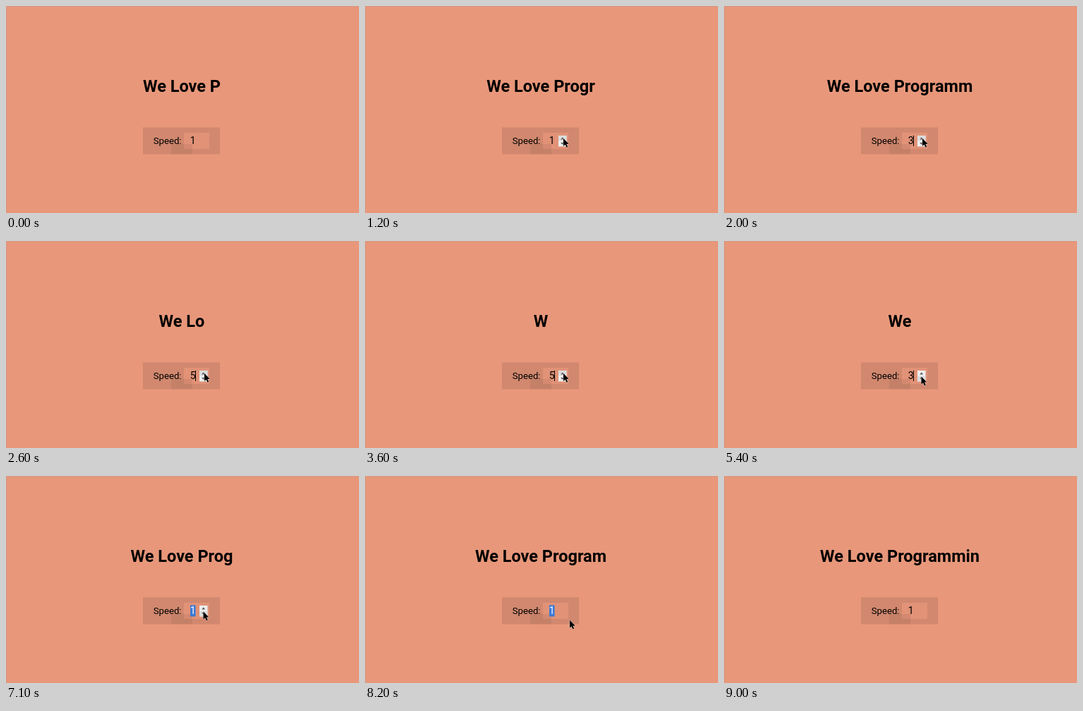
These frames come from a looping animation (500 by 294 pixels, 9100 ms). An HTML page with a canvas:

```html
<!DOCTYPE html>
<html lang="en">
<head>
<meta charset="utf-8">
<title>Auto text effect</title>
<style>
  html, body { margin: 0; width: 100%; height: 100%; overflow: hidden; background: #e8977a; }
  canvas { display: block; }
</style>
</head>
<body>
<canvas id="stage" width="500" height="294"></canvas>
<script>
const ctx = document.getElementById('stage').getContext('2d');
const LOOP = 9100, STEP = 100;
const MESSAGE = 'We Love Programming!';
const FONT = 'Roboto, sans-serif';

// Times of the clicks on the two spinner arrows
const ups = [1600, 1900, 2100, 2300];
const downs = [3900, 3950, 5900, 6100];

// Where the pointer tip rests
const entry = { x: 288, y: 245 };
const onUp = { x: 281, y: 188 };
const onDown = { x: 279.5, y: 192.5 };
const exit = { x: 363, y: 290 };

const between = (t, from, to) => t >= from && t < to;
const passed = (times, t) => times.filter(time => time <= t).length;
const speedAt = t => 1 + passed(ups, t) - passed(downs, t);

// Each letter waits 300 ms divided by the speed set when it was typed.
function typed(t) {
  let count = 9;
  for (let next = 300; next <= t; next += 300 / speedAt(next)) count++;
  return MESSAGE.slice(0, (count - 1) % MESSAGE.length + 1).trim();
}

function glide(t, start, end, from, to) {
  const k = Math.min(Math.max((t - start) / (end - start), 0), 1);
  return { x: from.x + (to.x - from.x) * k, y: from.y + (to.y - from.y) * k };
}

function pointerAt(t) {
  if (t < 2000) return glide(t, 300, 1200, entry, onUp);
  if (t < 6000) return glide(t, 3600, 3900, onUp, onDown);
  return glide(t, 8100, 8900, onDown, exit);
}

function rect(color, x, y, w, h) {
  ctx.fillStyle = color;
  ctx.fillRect(x, y, w, h);
}

function write(text, x, y, font, align = 'left', color = '#000') {
  ctx.font = `${font} ${FONT}`;
  ctx.textAlign = align;
  ctx.fillStyle = color;
  ctx.fillText(text, x, y);
}

function spinner(y) {
  rect('#eeeeee', 274, 184, 11.5, 15.5);
  rect('#dcdcdc', 274, y < 191 ? 184 : 192, 11.5, 7.5);
  ctx.fillStyle = '#555';
  ctx.fill(new Path2D('M277.2 189.5l2.5-3 2.5 3zM277.2 194l2.5 3 2.5-3z'));
}

function arrow(x, y) {
  const path = new Path2D(`M${x} ${y}v11l2.5-2.3 1.9 4 1.8-.8-1.8-3.9h3.4z`);
  ctx.strokeStyle = '#e8e0dc';
  ctx.lineWidth = 0.8;
  ctx.stroke(path);
  ctx.fillStyle = '#000';
  ctx.fill(path);
}

function draw(t) {
  rect('#d69883', 0, 0, 500, 294);
  rect('#e8977a', 1, 1, 499, 293);
  write(typed(t), 249, 122, 'bold 23.5px', 'center');

  rect('#d1886f', 194, 172.4, 109, 38.1);
  rect('#e19277', 252, 180, 36, 23);
  rect('rgba(0,0,0,.06)', 234, 196, 30, 14.5);
  write('Speed:', 208.7, 196, '13.2px');

  const selected = between(t, 6300, 8700);
  if (selected) rect('#3b79d6', 261, 183.5, 7.5, 16);
  write(speedAt(t), 260.7, 196, '14px', 'left', selected ? '#fff' : '#000');
  if (between(t, ups[0], 6300)) rect('#000', 268, 184, 1, 15);

  if (!between(t, 300, 9000)) return;
  const { x, y } = pointerAt(t);
  if (between(x, 252, 288) && between(y, 180, 203)) spinner(y);
  arrow(x, y);
}

const begin = performance.now();
function tick() {
  const t = (performance.now() - begin) % LOOP;
  draw(Math.floor(t / STEP) * STEP);
  requestAnimationFrame(tick);
}
tick();
</script>
</body>
</html>
```
